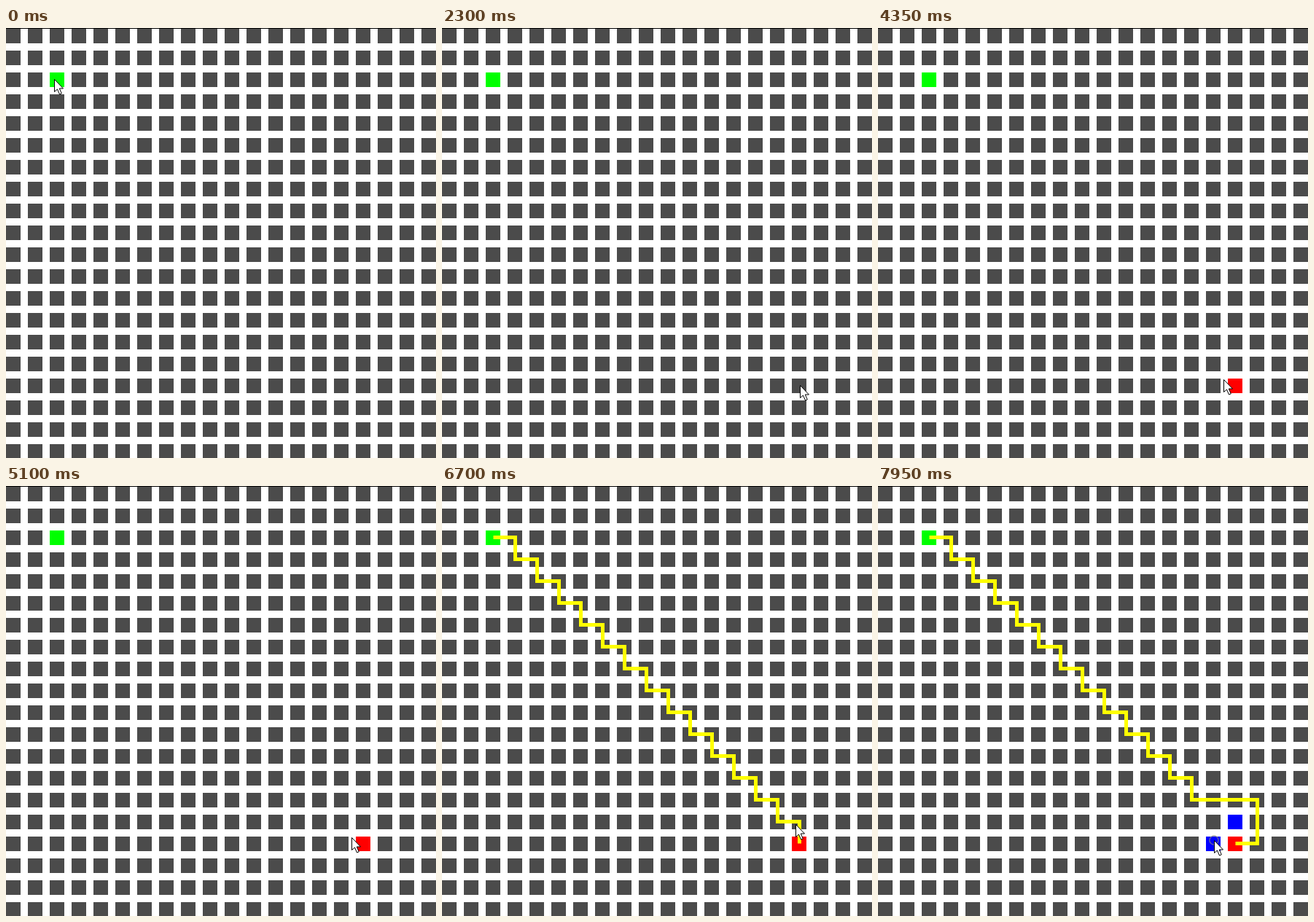
An HTML page with a canvas that plays this animation: 590 px wide and 590 px high, repeating every 8 s.

```html
<!DOCTYPE html>
<html lang="en">
<head>
<meta charset="utf-8">
<title>Grid path finder</title>
<style>
  html, body { margin: 0; width: 100%; height: 100%; overflow: hidden; background: #fff; }
  canvas { display: block; }
</style>
</head>
<body>
<canvas id="stage" width="590" height="590"></canvas>
<script>
const ctx = document.getElementById('stage').getContext('2d');
const LOOP = 8000, PITCH = 30, CELL = 20;

const END_AT = 2500, PATH_AT = 5200, WALL_1_AT = 7100, WALL_2_AT = 7800;

// Pointer moves: start time, end time, destination
const START = [66, 70];
const MOVES = [
  [850, 2250, 491, 490],
  [3800, 4150, 474, 482],
  [6300, 6800, 486, 462],
  [7150, 7500, 461, 486]
];
const CLICKS = [[END_AT, 491, 490], [WALL_1_AT, 486, 463], [WALL_2_AT, 461, 486]];
const RING_LIFE = 300;

const ARROW = new Path2D('M.5 .5V17.5L4.5 14L7.5 21L10.3 19.8L7.3 13H12.5Z');

const ease = p => p * p * (3 - 2 * p);

function pointerAt(t) {
  let [x, y] = START;
  for (const [from, to, endX, endY] of MOVES) {
    const p = ease(Math.min(1, Math.max(0, (t - from) / (to - from))));
    x += (endX - x) * p;
    y += (endY - y) * p;
  }
  return [x, y];
}

function cell(col, row, color) {
  ctx.fillStyle = color;
  ctx.fillRect(col * PITCH, row * PITCH + 1, CELL, CELL);
}

// Staircase to the given diagonal cell, followed by the remaining corners
function route(t) {
  const [last, tail] =
    t < WALL_1_AT ? [16, []] :
    t < WALL_2_AT ? [14, [[15, 14], [15, 16], [16, 16]]] :
    [14, [[17, 14], [17, 16], [16, 16]]];
  const points = [[2, 2]];
  for (let i = 3; i <= last; i++) points.push([i, i - 1], [i, i]);
  return points.concat(tail);
}

function drawRoute(t) {
  ctx.beginPath();
  for (const [col, row] of route(t)) ctx.lineTo(col * PITCH + 10.5, row * PITCH + 10.5);
  ctx.strokeStyle = '#ff0';
  ctx.lineWidth = 5;
  ctx.stroke();
}

function drawRings(t) {
  ctx.strokeStyle = 'rgba(128,128,128,.75)';
  ctx.lineWidth = 1.5;
  for (const [at, x, y] of CLICKS) {
    const age = t - at;
    if (age < 0 || age >= RING_LIFE) continue;
    const outer = age * 0.04;
    for (const radius of [outer, outer - 7]) {
      if (radius <= 0) continue;
      ctx.beginPath();
      ctx.arc(x, y, radius, 0, Math.PI * 2);
      ctx.stroke();
    }
  }
}

function drawPointer(t) {
  const [x, y] = pointerAt(t);
  ctx.save();
  ctx.translate(Math.round(x), Math.round(y));
  ctx.fillStyle = '#fff';
  ctx.strokeStyle = '#000';
  ctx.lineWidth = 1;
  ctx.fill(ARROW);
  ctx.stroke(ARROW);
  ctx.restore();
}

function draw(t) {
  ctx.fillStyle = '#fff';
  ctx.fillRect(0, 0, 590, 590);
  for (let row = 0; row < 20; row++)
    for (let col = 0; col < 20; col++) cell(col, row, '#4b4b4b');
  ctx.fillStyle = '#000';
  ctx.fillRect(0, 0, 590, 1);

  cell(2, 2, '#0f0');
  if (t >= END_AT) cell(16, 16, '#f00');
  if (t >= WALL_1_AT) cell(16, 15, '#00f');
  if (t >= WALL_2_AT) cell(15, 16, '#00f');
  if (t >= PATH_AT) drawRoute(t);
  drawRings(t);
  drawPointer(t);
}

const began = performance.now();
function tick() {
  draw((performance.now() - began) % LOOP);
  requestAnimationFrame(tick);
}
tick();
</script>
</body>
</html>
```
